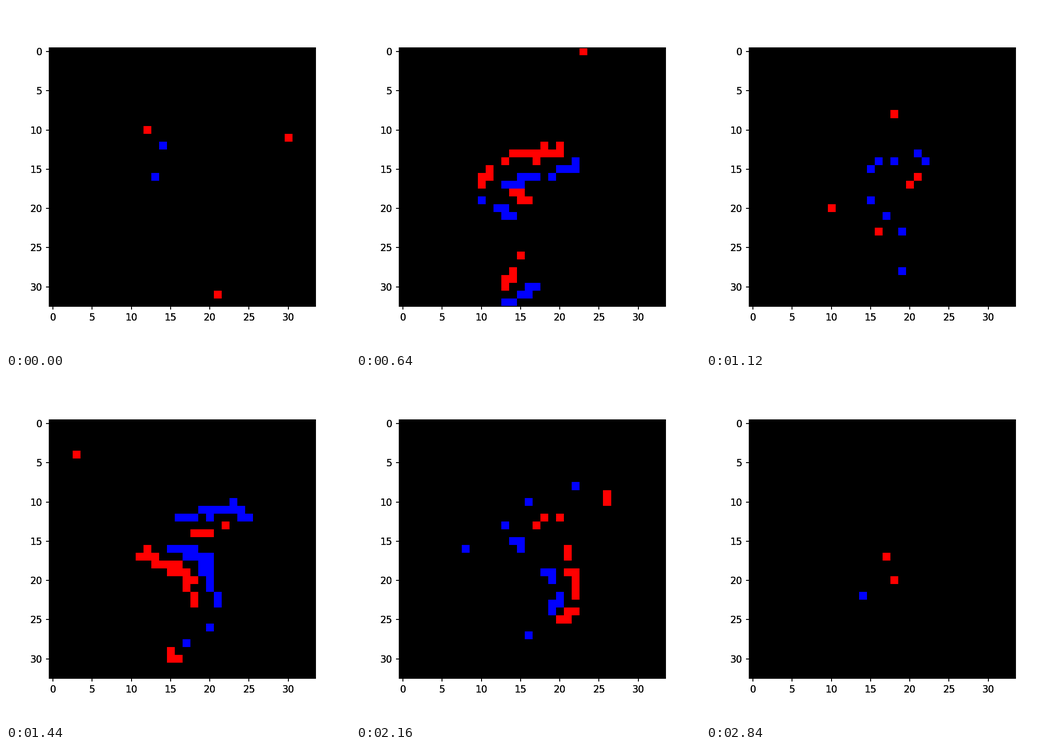
Recreate the animation shown at these times as a matplotlib script. Size 748x748 px, loop 2.88 s.

```python
import numpy as np
import matplotlib.pyplot as plt
from matplotlib.animation import FuncAnimation

W, H = 34, 33
FRAMES, INTERVAL = 72, 40
SWEEP = FRAMES // 3
BLUE, RED = (0, 0, 255), (255, 0, 0)
BOX = [0.125, 94.8 / 748, 0.775, 562.6 / 748]

# Key points of the handwritten digit, and the triangle it is moved along.
DIGIT = np.array([(19.8, 9.2), (13, 10.5), (10.3, 13.2), (15, 15.9),
                  (16.5, 21), (14.9, 25), (12.9, 26.2)])
CORNERS = np.array([(0, 0), (0.9, 5.7), (5.3, 0.3), (0, 0)])
HALF_WIDTH, SOFTNESS = 1.35, 0.4

grid = np.dstack(np.meshgrid(np.arange(W), np.arange(H))).astype(float)


def offset(t):
    """Sensor shift at frame time t: three eased sweeps."""
    leg = min(t // SWEEP, 2)
    u = t / SWEEP - leg
    ease = 0.82 * u**3 * (10 - 15 * u + 6 * u * u) + 0.18 * u
    return CORNERS[leg] + (CORNERS[leg + 1] - CORNERS[leg]) * ease


def brightness(shift):
    """Soft image of the digit moved by shift."""
    p = grid - shift
    dist = np.full((H, W), np.inf)
    for a, b in zip(DIGIT, DIGIT[1:]):
        d = b - a
        k = np.clip((p - a) @ d / (d @ d), 0, 1)
        gap = p - a - k[..., None] * d
        dist = np.minimum(dist, np.hypot(gap[..., 0], gap[..., 1]))
    return 1 / (1 + np.exp((dist - HALF_WIDTH) / SOFTNESS))


def events(i):
    """Blue where the picture brightens, red where it darkens, plus noise."""
    rng = np.random.default_rng(500 + i)
    img = np.zeros((H, W, 3), np.uint8)
    diff = brightness(offset(i + 1)) - brightness(offset(i))
    hit = rng.random((H, W)) < (5.2 * np.abs(diff)) ** 1.8
    img[hit & (diff > 0)] = BLUE
    img[hit & (diff < 0)] = RED
    for _ in range(rng.poisson(1.4)):
        x, y = rng.integers(W), rng.integers(H)
        img[y, x] = RED if rng.random() < 0.75 else BLUE
    return img


fig = plt.figure(figsize=(5, 5), dpi=149.6, facecolor="white")
# Stacked axes give the labels and the frame their heavier edges.
layers = [fig.add_axes(BOX, label=str(n)) for n in range(3)]
picture = layers[0].imshow(events(0), interpolation="nearest", aspect="auto")
for ax in layers:
    ax.patch.set_visible(False)
    ax.set(xlim=(-0.5, W - 0.5), ylim=(H - 0.5, -0.5),
           xticks=range(0, W, 5), yticks=range(0, H, 5))


def update(i):
    picture.set_data(events(i))
    return [picture]


anim = FuncAnimation(fig, update, frames=FRAMES, interval=INTERVAL,
                     repeat=True, repeat_delay=0, blit=False)
plt.show()
```
